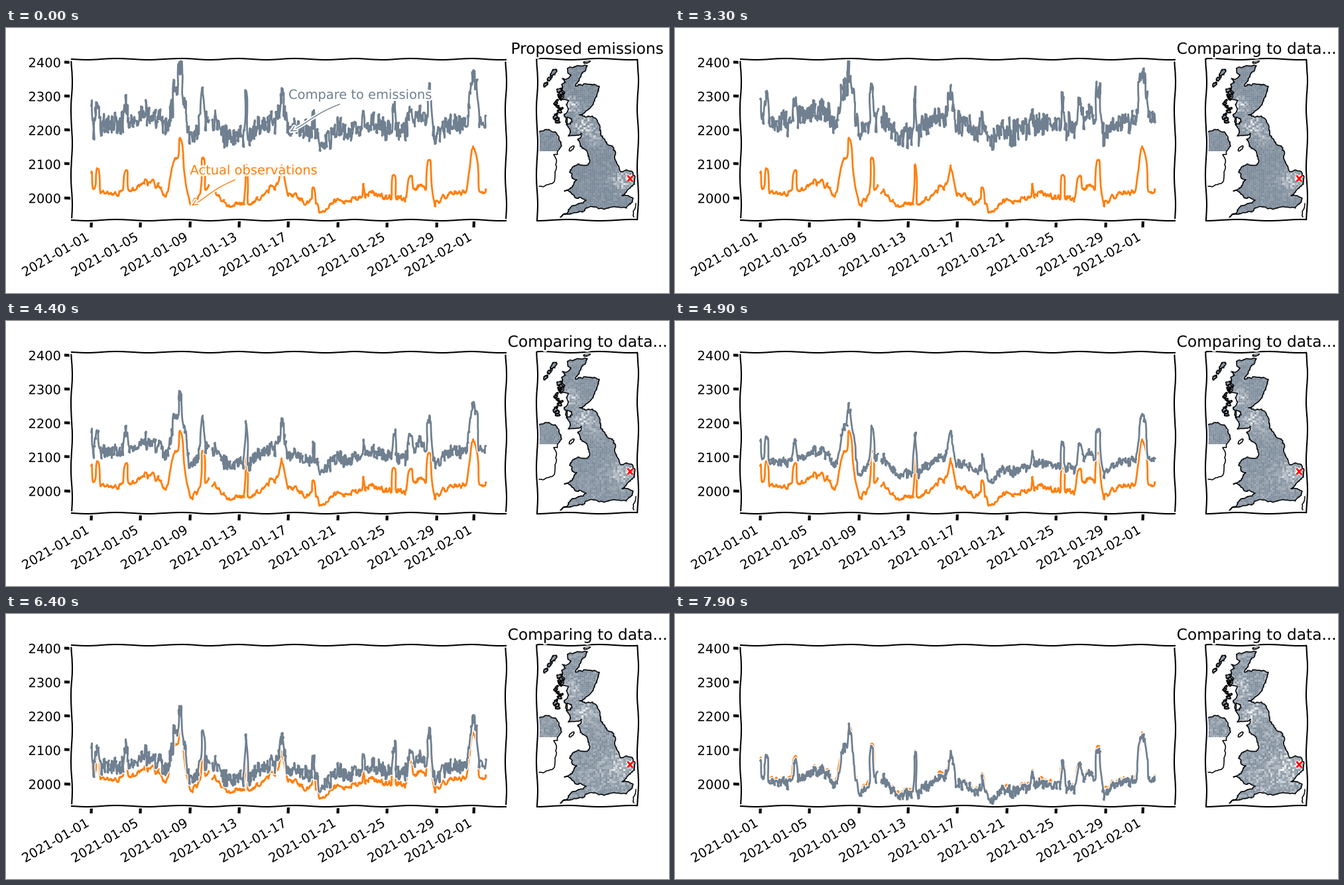
Recreate the animation shown at these times as a matplotlib script. Size 1000 by 400 pixels, loop 8000 ms.

```python
import numpy as np
import matplotlib.pyplot as plt
from matplotlib import patheffects
from matplotlib.animation import FuncAnimation
from matplotlib.patches import PathPatch
from matplotlib.path import Path

W, H, DPI = 1000, 400, 100
FRAMES, STEP = 80, 100
START = 26  # first frame of the comparison phase
SLATE, ORANGE = "slategray", "tab:orange"

plt.rcParams.update({
    "font.family": "DejaVu Sans", "font.size": 14,
    "path.sketch": (1, 100, 2),
    "path.effects": [patheffects.withStroke(linewidth=4, foreground="w")],
    "axes.linewidth": 1.5, "lines.linewidth": 2,
    "xtick.major.size": 8, "xtick.major.width": 3,
    "ytick.major.size": 8, "ytick.major.width": 3,
})
rng = np.random.default_rng(21)
fig = plt.figure(figsize=(W / DPI, H / DPI), dpi=DPI, facecolor="white")


def stage_axes(x0, x1, y0, y1):
    """Axes whose data units are stage pixels, y pointing down."""
    ax = fig.add_axes([x0 / W, 1 - y1 / H, (x1 - x0) / W, (y1 - y0) / H])
    ax.set(xlim=(x0, x1), ylim=(y1, y0))
    return ax


def plain(artist):
    artist.set_path_effects([])
    artist.set_sketch_params(None)
    return artist


# ---- time series ----
X0, DAY, HOURS = 128.56, 18.62, 768
LEVEL = [(128, 242), (167, 251), (222, 231), (246, 261), (280, 269),
         (306, 240), (338, 270), (372, 263), (414, 230), (425, 251),
         (458, 260), (476, 277), (500, 258), (512, 263), (552, 249),
         (575, 255), (602, 258), (625, 234), (648, 266), (670, 247),
         (725, 246)]
# centre, height, half width of the flat-topped peaks
PEAKS = [(129, 26, 2), (138, 30, 3), (181, 30, 3), (260, 68, 13),
         (263, 32, 3), (297, 50, 3), (362, 62, 2), (417, 22, 5),
         (464, 20, 2), (539, 18, 2), (585, 34, 3), (610, 25, 4),
         (639, 52, 4), (705, 64, 7)]

x = X0 + np.arange(HOURS) * DAY / 24
observed = np.interp(x, *zip(*LEVEL))
for cx, height, half in PEAKS:
    observed -= height * np.exp(-((x - cx) / half) ** 4)
observed += np.convolve(rng.normal(0, 5, HOURS), np.ones(4) / 4, "same")
observed[(x > 306.5) & (x < 310.5)] = np.nan
noise_a, noise_b = rng.normal(0, 9, (2, HOURS))

# frame, lift above the observations, share of each noise
POSES = [(25, 103, 1, 0), (33, 109, 0, 1), (39, 66, 1, 0),
         (49, 37, 0.15, 0.3), (64, 18, 0.75, 0), (79, -4, 0, 0.4)]


def modelled(i):
    frames, *tracks = zip(*POSES)
    lift, a, b = (np.interp(i, frames, t) for t in tracks)
    return observed - lift + a * noise_a + b * noise_b


ax = stage_axes(98.7, 754, 47.3, 290.3)
ax.plot(x, observed, color=ORANGE)
model_line, = ax.plot(x, modelled(0), color=SLATE)
ax.set_yticks([256.7 - 51.25 * k for k in range(5)],
              [str(2000 + 100 * k) for k in range(5)])
days = [*range(0, 31, 4), 31]
ax.set_xticks([X0 + DAY * d for d in days],
              [str(np.datetime64("2021-01-01") + d) for d in days],
              rotation=30, ha="right")


def note(text, tip, pos, color):
    arrow = dict(arrowstyle="->", color=color, connectionstyle="arc3,rad=0.05")
    return ax.annotate(text, tip, pos, color=color, arrowprops=arrow)


notes = [note("Compare to emissions", (426, 158), (426, 107), SLATE),
         note("Actual observations", (277.5, 270), (277.5, 221), ORANGE)]

# ---- map ----
BRITAIN = [
    (847, 61), (877, 57), (867, 73), (859, 88), (880, 85), (895, 88),
    (890, 104), (877, 124), (865, 131), (884, 133), (896, 150), (904, 171),
    (919, 186), (921, 204), (927, 217), (943, 216), (949, 224), (947, 236),
    (929, 253), (946, 257), (938, 268), (910, 271), (878, 271), (867, 277),
    (854, 280), (836, 286), (853, 269), (875, 260), (858, 256), (842, 246),
    (861, 229), (850, 218), (858, 208), (879, 205), (876, 185), (862, 168),
    (868, 159), (848, 163), (853, 137), (844, 142), (835, 108), (838, 85),
    (847, 61)]
IRELAND = [(803, 158), (819, 153), (829, 157), (838, 178), (826, 191),
           (830, 212), (826, 233), (804, 239)]


def rough(points, rounds=3):
    """Midpoint displacement, stronger on the north-western shore."""
    p = np.array(points, float)
    for _ in range(rounds):
        span = np.diff(p, axis=0)
        mid = p[:-1] + span / 2
        rugged = (mid[:, 0] < 857) & (mid[:, 1] < 150)
        push = rng.normal(0, np.where(rugged, 0.28, 0.1))[:, None]
        out = np.empty((2 * len(p) - 1, 2))
        out[::2] = p
        out[1::2] = mid + push * np.c_[-span[:, 1], span[:, 0]]
        p = out
    return p


def isle(cx, cy, size, aspect=0.5, tilt=-0.8):
    a = np.linspace(0, 2 * np.pi, 9)
    u, v = size * np.cos(a), aspect * size * np.sin(a)
    c, s = np.cos(tilt), np.sin(tilt)
    return rough(np.c_[cx + u * c - v * s, cy + u * s + v * c], 2)


britain, ireland = rough(BRITAIN), rough(IRELAND)
france = rough([(950, 265), (946, 277), (947, 285)], 2)
isles = [isle(826 - 6 * k, 67 + 9 * k, 6 - k) for k in range(3)]
for cy in np.linspace(94, 142, 13):
    isles.append(isle(rng.uniform(828, 838), cy, rng.uniform(2, 5),
                      tilt=rng.uniform(-1, 1)))
isles.append(isle(876, 51, 5, 0.4, -0.2))
man = isle(853, 182, 5, 0.45)

cells = np.stack(np.meshgrid(np.arange(803.5, 953, 3),
                             np.arange(49.5, 290, 3)), -1).reshape(-1, 2)
north = Path([*ireland, (803, 158)]).contains_points(cells) & (cells[:, 1] < 186)
inside = [Path(s).contains_points(cells, radius=r)
          for s in (britain, *isles) for r in (-1, 1)]
cells = cells[north | np.any(inside, axis=0)]


def shade(base, spread, spots):
    """Cell opacity: random speckle that thickens around pale spots."""
    pale = base + sum(h * np.exp(-((cells - (cx, cy)) ** 2).sum(1) / (2 * r * r))
                      for cx, cy, r, h in spots)
    return 1 - pale * (1 - spread + spread * rng.random(len(cells)) ** 2 * 2)


first = shade(0.1, 0.8, [(850, 118, 9, .55), (872, 146, 10, .5),
                         (887, 165, 8, .3), (930, 230, 12, .4)])
last = shade(0.27, 0.7, [(850, 112, 10, .3), (872, 150, 10, .45),
                         (925, 230, 16, .4), (885, 255, 14, .15)])

m = stage_axes(801.3, 952.9, 47.3, 290.3)
m.set(xticks=[], yticks=[])
m.spines[:].set_visible(False)
frame = Path([(0, 0), (0, 1), (1, 1), (1, 0), (0, 0)], closed=True)
m.add_patch(PathPatch(frame, fill=False, lw=1.5, transform=m.transAxes,
                      clip_on=False, zorder=2.5))
dots = plain(m.scatter(*cells.T, s=(2.88 * 72 / DPI) ** 2, marker="s",
                       color=SLATE, linewidths=0, zorder=1))
dots.set_snap(False)
for shape in (britain, ireland, france, man, *isles):
    plain(m.plot(*shape.T, color="black", lw=1.1)[0])
m.plot(941, 226.5, "x", color="red", ms=6, mew=2, zorder=4)
title = m.set_title("Proposed emissions")


def draw(i):
    on = i >= START
    title.set_text("Comparing to data..." if on else "Proposed emissions")
    for n in notes:
        n.set_visible(not on)
    model_line.set_ydata(modelled(i))
    k = np.clip((i - START + 1) / (FRAMES - START), 0, 1)
    dots.set_alpha(np.clip(first + (last - first) * k, 0.1, 1))
    return [title, model_line, dots, *notes]


anim = FuncAnimation(fig, draw, frames=FRAMES, interval=STEP,
                     init_func=lambda: draw(0), repeat=True, repeat_delay=0)
plt.show()
```
